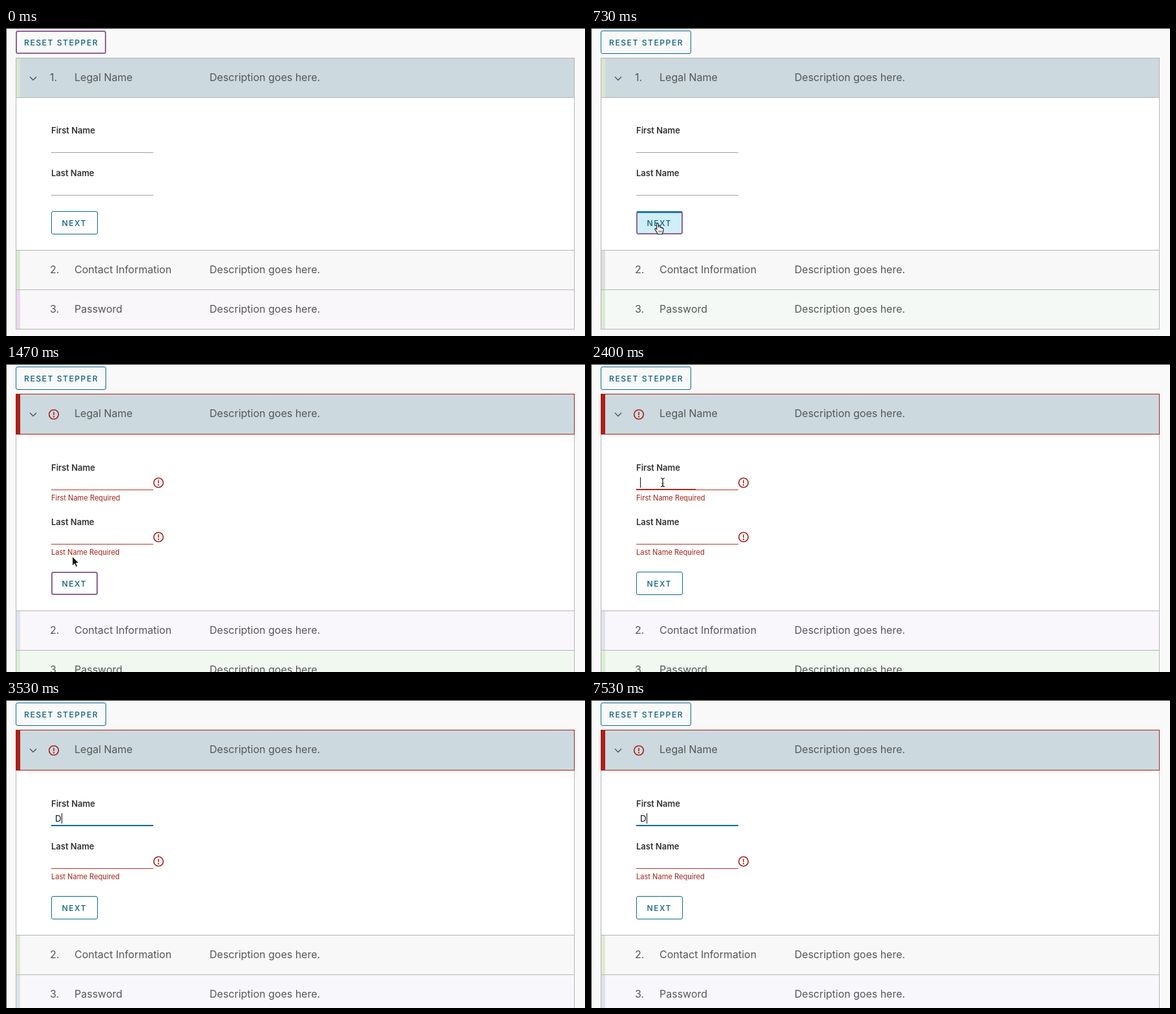
Recreate the animation shown at these times as an HTML page. Size 896 by 476 pixels, loop 8 s.

```html
<!DOCTYPE html>
<html lang="en">
<head>
<meta charset="utf-8">
<title>Stepper form</title>
<style>
html, body { margin: 0; width: 100%; height: 100%; overflow: hidden; background: #f9f9f9; }
svg { display: block; width: 896px; height: 476px; font-family: Inter, Roboto, sans-serif; }
.head { font-size: 16px; fill: #565656; }
.label { font-size: 13px; font-weight: 600; fill: #313131; }
.btn { font-size: 12.2px; font-weight: 500; letter-spacing: 1.5px; fill: #0b5f83; }
.err { font-size: 11.1px; fill: #a3231a; }
.input { font-size: 13.5px; fill: #111; }
</style>
</head>
<body>
<svg id="stage" viewBox="0 0 896 476"></svg>
<script>
const stage = document.getElementById('stage');
const LOOP = 8000, FPS = 15, TICKS = 120;
const BLUE = '#0b6a90', PURPLE = '#8b6396', RED = '#a9211a', GREY = '#b5b5b5';

// Ticks at which the form changes
const PRESS = 10, INVALID = 14, MOVE = 21, FOCUS = 36, TYPED = 51;

const clamp = v => Math.max(0, Math.min(1, v));
const smooth = v => v * v * (3 - 2 * v);
const bezier = (a, b, c, d, u) => {
  const w = 1 - u;
  return w * w * w * a + 3 * w * w * u * b + 3 * w * u * u * c + u * u * u * d;
};

const text = (cls, x, y, s) => `<text class="${cls}" x="${x}" y="${y}">${s}</text>`;
const rect = (x, y, w, h, fill) => `<rect x="${x}" y="${y}" width="${w}" height="${h}" fill="${fill}"/>`;
const frame = (y, h, fill, line) =>
  `<rect x="15.5" y="${y + .5}" width="864" height="${h}" fill="${fill}" stroke="${line}"/>`;
const alertIcon = (x, y) =>
  `<g transform="translate(${x} ${y})" stroke="${RED}" stroke-width="1.6" fill="none">
    <circle r="7.3"/><path d="M0-4V1"/></g><circle cx="${x}" cy="${y + 3.4}" r="1.1" fill="${RED}"/>`;

function button(x, y, w, h, label, focus, fill, pressed) {
  const b = focus ? 2 : 1;
  return `<rect x="${x + b / 2}" y="${y + b / 2}" width="${w - b}" height="${h - b}" rx="2.5"
    fill="#cfeef8" fill-opacity="${fill}" stroke="${focus ? PURPLE : BLUE}" stroke-width="${b}"/>` +
    (pressed ? rect(x + 1, y, w - 2, 3, '#2474a3') : '') + text('btn', x + 13 + (w < 100 ? 3.5 : 0), y + 22.5, label);
}

function row(y, n, title, bg, stripe) {
  return frame(y, 61, bg, GREY) + rect(16, y + 1, 6, 60, stripe) +
    text('head', 68, y + 36, n + '.') + text('head', 106, y + 36, title) +
    text('head', 315, y + 36, 'Description goes here.');
}

function field(y, label, invalid) {
  return text('label', 70, y, label) + rect(70, y + 29, 158, 1, invalid ? '#b3372c' : '#a0a0a0') +
    (invalid ? alertIcon(236, y + 18.5) + text('err', 70, y + 45.5, label + ' Required') : '');
}

const shapes = {
  arrow: '<path d="M0 0V14.5L3.4 11.3 5.6 16.4 8 15.4 5.8 10.4H10.4Z" fill="#111" stroke="#fff"/>',
  hand: `<path d="M-1.3 1.2C-1.3-.8 1.4-.8 1.4 1.2V6C2-.2 4.2 5 4.2 6.4 5 5.2 6.6 5.8 6.6 7.2
    7.6 6.4 8.8 7 8.8 8.4V11.5C8.8 13.5 7.6 14 7.4 16.5H.2C0 14-2.8 12-4 9.2-4.4 7.8-2.8 7-1.3 9Z"
    fill="#fff" stroke="#111" stroke-width="1.1"/><path d="M2 11V14M4 11V14M6 11V14" stroke="#111" stroke-width=".7"/>`,
  beam: `<path d="M-3-6.5Q0-6.5 0-4.5Q0-6.5 3-6.5M0-5V5M-3 6.5Q0 6.5 0 4.5Q0 6.5 3 6.5M-1.5 2H1.5"
    fill="none" stroke="#111" stroke-width="1.2"/>`
};

function pointer(k) {
  if (k < 3 || k >= TYPED) return '';
  let x, y, kind = 'arrow';
  if (k <= MOVE) {
    const u = 1 - Math.pow(1 - clamp((k - 2) / 7), 2);
    x = 235 - 132 * u;
    y = 405 - 103 * u;
    if (k < INVALID && x < 142 && y < 318) kind = 'hand';
    if (k >= INVALID) { x = 102; y = 301; }
  } else {
    const u = smooth(clamp((k - MOVE) / 12));
    x = bezier(102, 110, 320, 111, u);
    y = bezier(301, 240, 190, 183, u);
    if (y < 196) kind = 'beam';
  }
  return `<g transform="translate(${x.toFixed(1)} ${y.toFixed(1)})">${shapes[kind]}</g>`;
}

// Row and stripe tints: [row 2, row 3, stripe 2, stripe 3]
function tints(k) {
  if (k < PRESS) return ['#f8f8f8', '#f9f7fa', '#dce8d2', '#ecd9ee'];
  if (k < INVALID) return ['#f8f8f8', '#f5f9f6', '#dedede', '#d9ecd3'];
  if (k < TYPED) return ['#f9f7fb', '#f0f8f0', '#dfe3ee', '#d8f0d3'];
  return ['#f8f8f8', '#f8f7fb', '#dfead4', '#dde3ec'];
}

function caretOn(k) {
  if (k < FOCUS) return false;
  if (k < TYPED) return k < 43;
  return k < 60 || Math.floor(k / 7.5) % 2 === 1;
}

function draw(k) {
  const invalid = k >= INVALID, typed = k >= TYPED;
  const bottom = !invalid ? 343 : typed ? 363 : 381;
  const next = !invalid ? 283 : typed ? 303 : 321;
  const last = !invalid ? 229 : typed ? 231 : 249;
  const [bg2, bg3, s2, s3] = tints(k);
  const pressed = k >= PRESS && k < INVALID;
  const fill = k < INVALID ? clamp((k - 6) / 4) : clamp((16 - k) / 3);

  let out = rect(0, 0, 896, 476, '#f9f9f9') +
    button(15, 4, 140, 36, 'RESET STEPPER', k < PRESS, 0, false) +
    frame(46, bottom - 46, '#fff', GREY) +
    row(bottom, 2, 'Contact Information', bg2, s2) +
    row(bottom + 61, 3, 'Password', bg3, s3) +
    frame(46, invalid ? 62 : 61, '#ccd9df', invalid ? RED : GREY) +
    (invalid ? rect(15, 46, 7, 63, RED) + alertIcon(74, 78)
             : rect(16, 47, 6, 60, '#d8e6d0') + text('head', 68, 82, '1.')) +
    '<path d="M37 75.5L42 80.5 47 75.5" fill="none" stroke="#565656" stroke-width="1.5"/>' +
    text('head', 106, 82, 'Legal Name') + text('head', 315, 82, 'Description goes here.') +
    field(invalid ? 165 : 163, 'First Name', invalid && !typed) +
    field(last, 'Last Name', invalid) +
    button(70, next, 72, 36, 'NEXT', k >= PRESS && k < FOCUS, fill, pressed);

  if (k >= FOCUS) {
    const grow = 1 - .42 * Math.pow(1 - clamp((k - FOCUS) / 2), 2);
    const color = !typed ? '#b3241b' : k < 53 ? '#5d4a64' : '#0b6a9a';
    out += rect(70, 193, Math.round(158 * grow), 2, color);
  }
  if (typed) out += text('input', 76, 187.5, 'D');
  if (caretOn(k)) out += rect(typed ? 86 : 76, 175, 1, 16, '#111');
  out += pointer(k) + rect(0, 0, 896, 1, '#222') + rect(0, 0, 1, 476, '#444');
  stage.innerHTML = out;
}

let shown = -1;
function loop() {
  const t = performance.now() % LOOP;
  const k = Math.min(TICKS - 1, Math.floor((t + 4) * FPS / 1000));
  if (k !== shown) draw(shown = k);
  requestAnimationFrame(loop);
}
loop();
</script>
</body>
</html>
```
